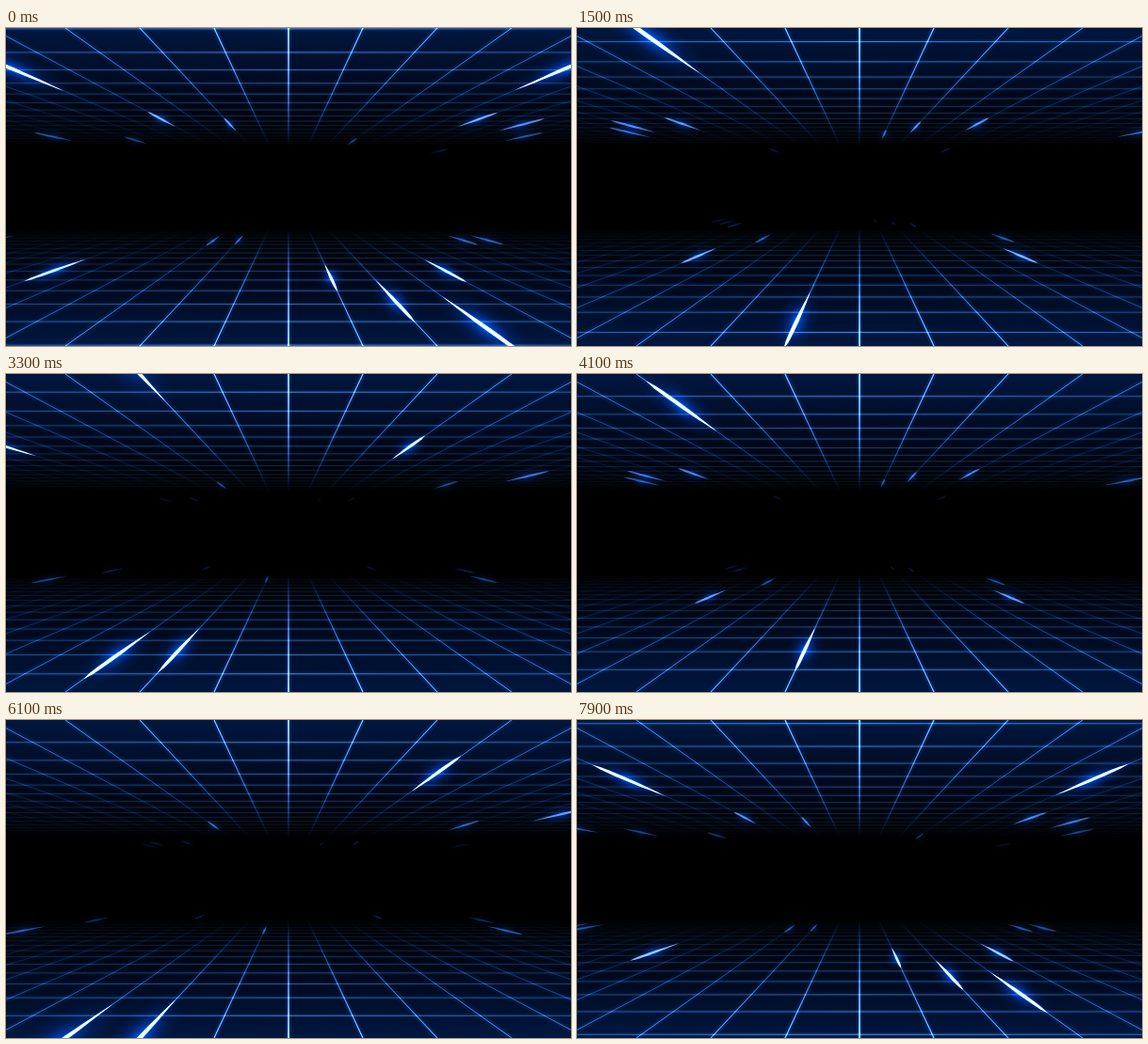
An HTML page with a canvas for the animation above (8 s loop, 600 by 338 pixels).

```html
<!DOCTYPE html>
<html lang="en">
<head>
<meta charset="utf-8">
<title>Neon grid</title>
<style>
  html, body { margin: 0; width: 100%; height: 100%; overflow: hidden; background: #000; }
  canvas { display: block; width: 600px; height: 338px; }
</style>
</head>
<body>
<canvas id="stage" width="600" height="338"></canvas>
<script>
const W = 600, H = 338, CX = 300, CY = 169;
const LANE = 79;              // lane spacing at the screen edge
const DEPTH = 960;            // distance from horizon = DEPTH / z
const SPEED = 14.55;          // streak speed, rows per second
const CYCLE = 8 / 3;          // streak pattern repeats three times per loop
const SPAN = SPEED * CYCLE;
const LENGTH = 2.95;

// [lane, depth at time zero]
const ceiling = [
  [-5, 6.45], [5, 6.4], [-4, 12], [-2, 13.1], [6, 12.1], [8, 13.2], [10, 16.6],
  [-10, 16.6], [-7, 18], [3, 18.5], [-12, 15.1], [9, 23.8], [7, 26.65], [-3, 26.8],
  [-8, 35.4], [-6, 34.8], [-9, 37], [4, 34.9], [2, 35.6], [1, 37.6], [11, 36.9]
];
const floor = [
  [-6, 9.6], [3, 5.3], [2, 6.7], [4, 9.5], [1, 8.7], [-3, 15.4], [-2, 15.7],
  [7, 15.6], [8, 15.7], [-9, 8.6], [-8, 7.1], [-7, 5.4], [-12, 15.5], [-13, 16],
  [-11, 27.3], [-10, 31.8], [10, 31.8], [-5, 33.65], [-4, 38], [-1, 27.4],
  [9, 27.4], [5, 33.65], [6, 38.2]
];

const clamp = v => Math.max(0, Math.min(1, v));
const mod = (a, n) => ((a % n) + n) % n;

function layer(w, h, paint) {
  const c = document.createElement('canvas');
  c.width = w;
  c.height = h;
  paint(c.getContext('2d'));
  return c;
}

// Mirrored vertical gradient; stops are [distance from horizon, colour]
function mirrored(g2d, stops) {
  const g = g2d.createLinearGradient(0, 0, 0, H);
  for (const [d, c] of stops) {
    g.addColorStop((CY - d) / H, c);
    g.addColorStop((CY + d) / H, c);
  }
  return g;
}

const backdrop = layer(W, H, c => {
  const haze = mirrored(c, [
    [169, 'rgb(1,23,63)'], [135, 'rgb(0,16,46)'], [100, 'rgb(0,8,27)'],
    [70, 'rgb(0,3,11)'], [45, 'rgb(0,0,0)']
  ]);
  const beam = mirrored(c, [
    [169, 'rgba(175,217,255,1)'], [125, 'rgba(130,188,255,.85)'], [90, 'rgba(85,150,245,.58)'],
    [62, 'rgba(50,110,220,.28)'], [42, 'rgba(30,80,190,0)']
  ]);
  const aura = mirrored(c, [
    [169, 'rgba(0,80,220,.2)'], [100, 'rgba(0,70,200,.12)'], [45, 'rgba(0,60,180,0)']
  ]);
  c.fillStyle = haze;
  c.fillRect(0, 0, W, H);
  c.globalCompositeOperation = 'lighter';
  for (let k = -16; k <= 16; k++) {
    const a = Math.abs(k);
    c.beginPath();
    for (const y of [0, H]) {
      c.moveTo(CX + LANE * k, y);
      c.lineTo(CX, CY);
    }
    c.globalAlpha = 1 / (1 + a * .17);
    c.strokeStyle = aura;
    c.lineWidth = 6;
    c.stroke();
    c.strokeStyle = beam;
    c.lineWidth = k ? Math.max(.65, 1.25 - a * .11) : 1.7;
    c.stroke();
  }
});

const glow = layer(64, 64, c => {
  const g = c.createRadialGradient(32, 32, 0, 32, 32, 32);
  g.addColorStop(0, 'rgba(0,95,255,.75)');
  g.addColorStop(.3, 'rgba(0,80,245,.36)');
  g.addColorStop(.6, 'rgba(0,65,220,.11)');
  g.addColorStop(1, 'rgba(0,50,200,0)');
  c.fillStyle = g;
  c.fillRect(0, 0, 64, 64);
});

const ctx = document.getElementById('stage').getContext('2d');
const row = ctx.createLinearGradient(0, 0, W, 0);
row.addColorStop(0, 'rgba(60,130,210,.75)');
row.addColorStop(.5, 'rgba(85,155,235,1)');
row.addColorStop(1, 'rgba(60,130,210,.75)');

function drawRows(t) {
  const phase = mod(.71 - t, 1);
  ctx.fillStyle = row;
  for (let n = 5; n < 22; n++) {
    const d = DEPTH / (n + phase);
    if (d > 171) continue;
    for (const side of [-1, 1]) {
      const y = CY + side * d;
      ctx.globalAlpha = .09 * clamp((d - 45) / 115);
      ctx.fillRect(0, y - 2, W, 4);
      ctx.globalAlpha = .8 * Math.pow(clamp((d - 44) / 120), .9);
      ctx.fillRect(0, y - .45, W, .9);
    }
  }
}

function drawStreak(side, lane, near) {
  const slope = LANE * lane / CY;
  const head = DEPTH / Math.max(2.5, near);
  const tail = DEPTH / (near + LENGTH);
  const mid = DEPTH / (near + LENGTH * .35);
  const power = clamp((mid - 35) / 62);
  if (power <= 0 || tail > 175 || Math.abs(slope * tail) > 310) return;

  // local x runs from the horizon along the lane
  const len = Math.hypot(slope, 1);
  const a = head * len, b = tail * len;
  ctx.save();
  ctx.translate(CX, CY);
  ctx.rotate(Math.atan2(side, slope));

  const gl = (a - b) * 1.15, gw = 5 + mid * .26;
  ctx.globalAlpha = power;
  ctx.drawImage(glow, (a + b) / 2 - gl / 2, -gw / 2, gl, gw);

  const upper = [], lower = [];
  for (let i = 0; i <= 12; i++) {
    const u = i / 12;
    const d = DEPTH / Math.max(2.5, near + LENGTH * u);
    const half = 5 * Math.sqrt(u) * (1 - u) * (.2 + d / 170);
    upper.push([d * len, half]);
    lower.unshift([d * len, -half]);
  }
  ctx.beginPath();
  for (const [x, y] of upper.concat(lower)) ctx.lineTo(x, y);
  ctx.closePath();
  ctx.globalAlpha = .12 + .88 * power;
  ctx.fillStyle = `rgb(${35 + 195 * power},${110 + 130 * power},255)`;
  ctx.fill();
  ctx.restore();
}

function drawStreaks(t) {
  const travel = SPEED * (t % CYCLE);
  const place = (list, side) => {
    for (const [lane, z] of list) {
      drawStreak(side, lane, mod(z - travel - 1.5, SPAN) + 1.5);
    }
  };
  place(ceiling, -1);
  place(floor, 1);
}

function draw(t) {
  ctx.globalCompositeOperation = 'copy';
  ctx.globalAlpha = 1;
  ctx.drawImage(backdrop, 0, 0);
  ctx.globalCompositeOperation = 'lighter';
  drawRows(t);
  drawStreaks(t);
}

const start = performance.now();
let shown = -1;
function tick() {
  const step = Math.floor(((performance.now() - start) % 8000) / 100);
  if (step !== shown) {
    shown = step;
    draw(step / 10);
  }
  requestAnimationFrame(tick);
}
tick();
</script>
</body>
</html>
```
